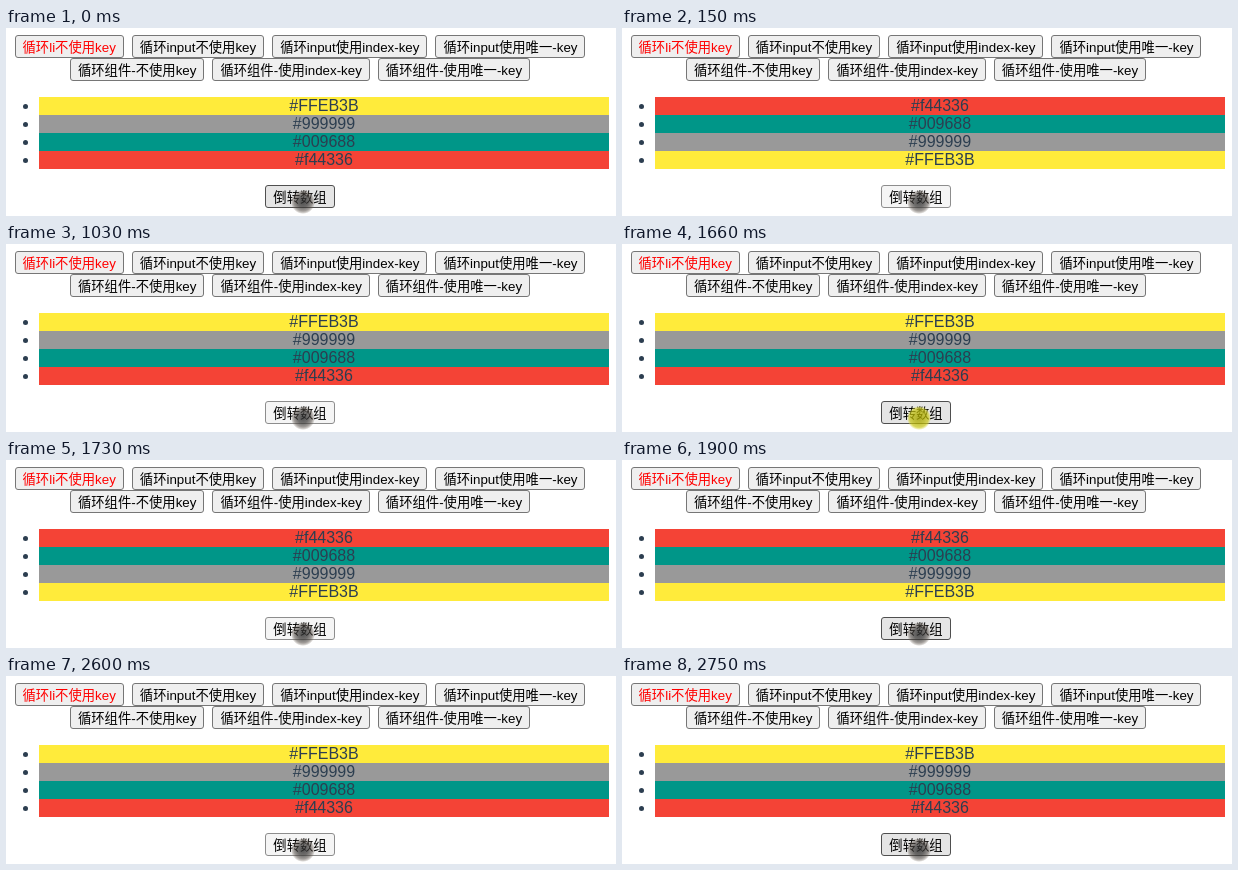
These frames come from a looping animation (610x188 px, 2830 ms). An HTML page:

```html
<!DOCTYPE html>
<html lang="zh-CN">
<head>
<meta charset="utf-8">
<title>key 演示</title>
<style>
html, body {
  margin: 0;
  width: 100%;
  height: 100%;
  overflow: hidden;
  background: #fff;
}
body {
  position: relative;
  color: #2c3e50;
  font: 16px/18px "Liberation Sans", "Noto Sans CJK SC", "Noto Sans CJK", sans-serif;
}
.row, ul {
  position: absolute;
  left: -7px;
  width: 610px;
  box-sizing: border-box;
  margin: 0;
}
.row {
  display: flex;
  justify-content: center;
}
.btn {
  box-sizing: border-box;
  flex: none;
  height: 23px;
  margin-right: 8px;
  padding: 1px 7px 0;
  border: 1px solid #767676;
  border-radius: 3px;
  background: #efefef;
  color: #000;
  font-size: 13.3333px;
  line-height: 21px;
  white-space: nowrap;
}
.on { color: #f00; }
ul {
  top: 69px;
  padding: 0 0 0 40px;
  display: flex;
  flex-direction: column;
  text-align: center;
  animation: flip 2830ms step-end infinite;
}
li { height: 18px; }
.flip { animation: press 2830ms step-end infinite; }
.spot {
  position: absolute;
  left: 285px;
  top: 162px;
  width: 24px;
  height: 24px;
  border-radius: 50%;
}
.down {
  background: radial-gradient(circle closest-side,
    rgba(45, 45, 45, .8) 0, rgba(60, 58, 56, .72) 45%,
    rgba(85, 78, 72, .55) 75%, rgba(110, 100, 90, .3) 90%, rgba(120, 110, 100, 0) 100%);
  animation: down 2830ms step-end infinite;
}
.up {
  background: radial-gradient(circle closest-side,
    rgba(165, 163, 0, .8) 0, rgba(180, 178, 0, .75) 45%,
    rgba(200, 198, 20, .7) 78%, rgba(215, 213, 60, .4) 91%, rgba(225, 222, 90, 0) 100%);
  animation: up 2830ms step-end infinite;
}
@keyframes flip {
  0%, 36.39%, 91.87%, 100% { flex-direction: column; }
  5.3%, 61.13% { flex-direction: column-reverse; }
}
@keyframes press {
  0%, 11.3%, 41.69%, 67.13%, 97.17%, 100% { background: #e5e5e5; border-color: #4f4f4f; }
  5.3%, 36.39%, 61.13%, 91.87% { background: #f5f5f5; border-color: #8d8d8d; }
}
@keyframes down {
  0%, 5.3%, 36.39%, 61.13%, 91.87%, 100% { opacity: 1; }
  2.82%, 30.38%, 58.65%, 86.57% { opacity: 0; }
}
@keyframes up {
  0%, 5.3%, 36.39%, 61.13%, 91.87%, 100% { opacity: 0; }
  2.82%, 30.38%, 58.65%, 86.57% { opacity: 1; }
}
</style>
</head>
<body>
<div class="row" style="top:7px">
  <span class="btn on">循环li不使用key</span>
  <span class="btn">循环input不使用key</span>
  <span class="btn">循环input使用index-key</span>
  <span class="btn">循环input使用唯一-key</span>
</div>
<div class="row" style="top:30px">
  <span class="btn">循环组件-不使用key</span>
  <span class="btn">循环组件-使用index-key</span>
  <span class="btn">循环组件-使用唯一-key</span>
</div>
<ul>
  <li style="background:#ffeb3b">#FFEB3B</li>
  <li style="background:#999999">#999999</li>
  <li style="background:#009688">#009688</li>
  <li style="background:#f44336">#f44336</li>
</ul>
<div class="row" style="top:157px">
  <span class="btn flip">倒转数组</span>
</div>
<div class="spot down"></div>
<div class="spot up"></div>
</body>
</html>
```
